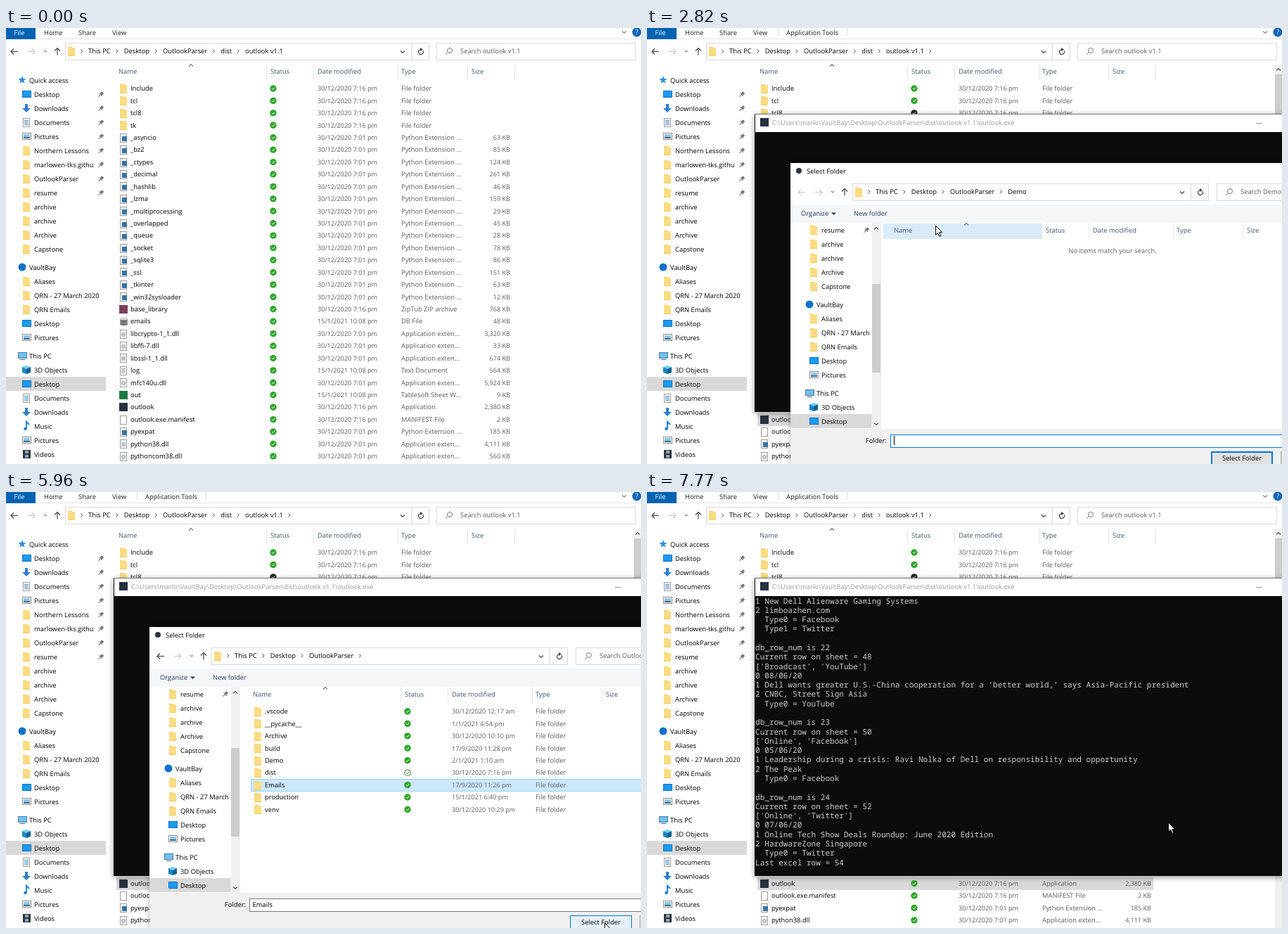
These frames come from a looping animation (903 by 620 pixels, 8000 ms). An HTML page with a canvas:

```html
<!DOCTYPE html>
<html lang="en">
<meta charset="utf-8">
<title>Folder parser demo</title>
<style>
  html, body { margin: 0; width: 100%; height: 100%; overflow: hidden; background: #fff; }
  #stage { position: relative; width: 100%; height: 100%; overflow: hidden; overflow: clip; contain: strict; }
  canvas { position: absolute; left: 0; top: 0; }
</style>
<body>
<div id="stage"></div>
<script>
const LOOP = 8000, ROW = 17.43, BLUE = '#0078d7', GREY = '#5c5c5c';
let g; // context of the layer being drawn

function makeLayer(originX, originY) {
  const canvas = document.createElement('canvas');
  canvas.width = 960;
  canvas.height = 660;
  canvas.style.transformOrigin = `${originX}px ${originY}px`;
  document.getElementById('stage').append(canvas);
  const ctx = canvas.getContext('2d');
  ctx.textRendering = 'geometricPrecision';
  return ctx;
}
const explorerLayer = makeLayer(0, 0), consoleLayer = makeLayer(581, 334);
const dialogLayer = makeLayer(567, 398), pointerLayer = makeLayer(0, 0);

// Drawing helpers
const UI_FONT = '"Open Sans", "Noto Sans", sans-serif';
const MONO_FONT = '11.06px "Noto Sans Mono", "DejaVu Sans Mono", monospace';

function text(s, x, y, color = '#000', align = 'left', size = 9.4) {
  g.font = `${size}px ${UI_FONT}`;
  g.fillStyle = color;
  g.textAlign = align;
  g.fillText(s, x, Math.round(y + 3.3));
  return g.measureText(s).width;
}
const digits = (s, x, y, align) => text(s, x, y, GREY, align, 9.1);

function box(x, y, w, h, fill, stroke) {
  if (fill) { g.fillStyle = fill; g.fillRect(x, y, w, h); }
  if (stroke) { g.strokeStyle = stroke; g.lineWidth = 1; g.strokeRect(x + .5, y + .5, w - 1, h - 1); }
}
function line(color, width, ...points) {
  g.strokeStyle = color;
  g.lineWidth = width;
  g.beginPath();
  points.forEach(p => g.lineTo(...p));
  g.stroke();
}
function shape(fill, ...points) {
  g.fillStyle = fill;
  g.beginPath();
  points.forEach(p => g.lineTo(...p));
  g.fill();
}
function disc(x, y, r, fill) {
  g.fillStyle = fill;
  g.beginPath();
  g.arc(x, y, r, 0, 7);
  g.fill();
}
function at(x, y, draw) {
  g.save();
  g.translate(x, y);
  draw();
  g.restore();
}
function shadowBox(x, y, w, h, fill, strength) {
  g.save();
  g.shadowColor = `rgba(0,0,0,${strength})`;
  g.shadowBlur = 8;
  g.shadowOffsetY = 2;
  box(x, y, w, h, fill);
  g.restore();
}
const right = (x, y) => line('#444', 1, [x - 1.3, y - 2.6], [x + 1.3, y], [x - 1.3, y + 2.6]);
const down = (x, y, s = 3, color = '#444') => line(color, 1.2, [x - s, y - s / 2], [x, y + s / 2], [x + s, y - s / 2]);
const up = (x, y, s = 3, color = '#666') => line(color, 1.2, [x - s, y + s / 2], [x, y - s / 2], [x + s, y + s / 2]);
const arrow = (x, y, color) => {
  line(color, 1.2, [x - 5, y], [x + 5, y]);
  line(color, 1.2, [x - 1, y - 4], [x - 5, y], [x - 1, y + 4]);
};

const page = () => box(-5, -6, 10, 13, '#fff', '#9a9a9a');
const pageLines = color => { page(); for (let y = -3; y < 5; y += 2) box(-3, y, 6, 1, color); };
const screen = () => box(-6, -5, 13, 10, '#1a9cf0', '#0b6fc0');
const icons = {
  folder() { box(-5, -6, 6, 12, '#f5d06c'); box(-5, -5, 10, 12, '#fbdc82'); box(-5, 6, 10, 1, '#efc75f'); },
  py() { page(); box(-2, -2, 7, 7, '#3572a5'); },
  dll() { page(); disc(0, 1, 3, '#a9b0b8'); disc(0, 1, 1.2, '#fff'); },
  page,
  log() { pageLines('#999'); },
  doc() { pageLines('#4d8fc4'); },
  zip() { box(-6, -6, 12, 12, '#7a3f58'); },
  xls() { box(-6, -6, 12, 12, '#1d7a45'); },
  exe() { box(-6, -6, 12, 12, '#26303f'); },
  db() {
    box(-5, -4, 11, 9, '#a6a6a6');
    for (const y of [-4, 0, 4]) { g.fillStyle = y < 0 ? '#ddd' : '#777'; g.beginPath(); g.ellipse(.5, y, 5.5, 2, 0, 0, 7); g.fill(); }
  },
  star() {
    const tips = Array.from({ length: 10 }, (_, i) => {
      const a = i * Math.PI / 5 - Math.PI / 2, r = i % 2 ? 2.4 : 6;
      return [r * Math.cos(a), r * Math.sin(a)];
    });
    shape('#2a8dd8', ...tips);
  },
  desktop: screen,
  download() { shape('#2f7fcb', [-2, -6], [2, -6], [2, 0], [6, 0], [0, 6], [-6, 0], [-2, 0]); },
  picture() { box(-6, -5, 13, 10, '#fff', '#888'); box(-4, -3, 9, 6, '#8cc5ec'); box(-4, 1, 9, 2, '#49687a'); },
  cloud() { disc(0, 0, 5.5, '#0a72c8'); },
  pc() { box(-6, -5, 13, 9, '#6fc0f2', '#467a9c'); box(-3, 5, 7, 1, '#567'); },
  cube() {
    shape('#6fd0ef', [0, -6], [6, -4], [0, -1], [-6, -4]);
    shape('#1c86c4', [-6, -4], [0, -1], [0, 6], [-6, 4]);
    shape('#0d5f98', [6, -4], [0, -1], [0, 6], [6, 4]);
  },
  music() { line('#1f84d6', 2, [0, 4], [0, -6], [4, -2]); disc(-1.5, 4, 2.3, '#1f84d6'); },
  video() { box(-5, -6, 11, 12, '#333'); box(-2, -5, 5, 4, '#7aa9cf'); box(-2, 1, 5, 4, '#7aa9cf'); }
};
const icon = (name, x, y) => at(Math.round(x), Math.round(y), icons[name]);

// Data
const sideGroups = [
  [74, 'star Quick access;desktop Desktop;download Downloads;doc Documents;picture Pictures;folder Northern Lessons;' +
       'folder marlowen-tks.githu;folder OutlookParser;folder resume;folder archive;folder archive;folder Archive;folder Capstone'],
  [340, 'cloud VaultBay;folder Aliases;folder QRN - 27 March 2020;folder QRN Emails;desktop Desktop;picture Pictures'],
  [466, 'pc This PC;cube 3D Objects;desktop Desktop;doc Documents;download Downloads;music Music;picture Pictures;video Videos']
].map(([y, list]) => [y, list.split(';').map(s => [s.slice(0, s.indexOf(' ')), s.slice(s.indexOf(' ') + 1)])]);

const early = '30/12/2020 7:01 pm', late = '30/12/2020 7:16 pm', recent = '15/1/2021 10:08 pm';
const kinds = {
  folder: ['File folder', late], py: ['Python Extension ...', early], dll: ['Application exten...', early],
  zip: ['ZipTub ZIP archive', late], db: ['DB File', recent], log: ['Text Document', recent],
  xls: ['Tablesoft Sheet W...', recent], exe: ['Application', late], page: ['MANIFEST File', late]
};
const files = ('folder Include;folder tcl;folder tcl8;folder tk;py _asyncio 63;py _bz2 85;py _ctypes 124;py _decimal 261;' +
  'py _hashlib 46;py _lzma 159;py _multiprocessing 29;py _overlapped 45;py _queue 28;py _socket 78;py _sqlite3 86;' +
  'py _ssl 151;py _tkinter 63;py _win32sysloader 12;zip base_library 768;db emails 48;dll libcrypto-1_1.dll 3,320;' +
  'dll libffi-7.dll 33;dll libssl-1_1.dll 674;log log 564;dll mfc140u.dll 5,924;xls out 9;exe outlook 2,380;' +
  'page outlook.exe.manifest 2;py pyexpat 185;dll python38.dll 4,111;dll pythoncom38.dll 560;dll pywintypes38.dll 140')
  .split(';').map(s => {
    const [kind, name, size] = s.split(' ');
    return { kind, name, size, type: kinds[kind][0], date: kinds[kind][1] };
  });
const shiftedFiles = [...files.slice(0, 4), files[4], ...files.slice(4)];
const OUTLOOK = files.findIndex(f => f.name === 'outlook');

const projectFolders = ('.vscode 30/12/2020 12:17 am;__pycache__ 1/1/2021 4:54 pm;Archive 30/12/2020 10:10 pm;' +
  'build 17/9/2020 11:28 pm;Demo 2/1/2021 1:10 am;dist 30/12/2020 7:16 pm;Emails 17/9/2020 11:26 pm;' +
  'production 15/1/2021 6:40 pm;venv 30/12/2020 10:29 pm').split(';').map(s => {
    const [name, ...date] = s.split(' ');
    return { kind: 'folder', name, date: date.join(' '), type: 'File folder', tick: name === 'dist' ? 'hollow' : '' };
  });
const EMAILS = 6;

const entry = (row, media, day, title, outlet) => [
  `db_row_num is ${row}`, `Current row on sheet = ${row * 2 + 4}`,
  `[${media.map(m => `'${m}'`).join(', ')}]`, `0 ${day}/06/20`, `1 ${title}`, `2 ${outlet}`,
  ...media.slice(1).map((m, i) => `  Type${i} = ${m}`), ''
];
const titles = ['Remote work tips for small teams', 'New laptops arrive in June', 'Keeping data safe at home', 'Student device deals'];
const output = [];
for (let row = 1; row < 21; row++)
  output.push(...entry(row, ['Online', row % 3 ? 'Facebook' : 'Twitter'], `0${row % 9 + 1}`, titles[row % 4], 'Daily Tech Notes'));
output.push(
  ...entry(21, ['Online', 'Facebook', 'Twitter'], '05', 'New Dell Alienware Gaming Systems', 'limboazhen.com'),
  ...entry(22, ['Broadcast', 'YouTube'], '08', 'Dell wants greater U.S.-China cooperation for a ‘better world,’ says Asia-Pacific president', 'CNBC, Street Sign Asia'),
  ...entry(23, ['Online', 'Facebook'], '05', 'Leadership during a crisis: Ravi Nolka of Dell on responsibility and opportunity', 'The Peak'),
  ...entry(24, ['Online', 'Twitter'], '07', 'Online Tech Show Deals Roundup: June 2020 Edition', 'HardwareZone Singapore').slice(0, -1),
  'Last excel row = 54');

// Parts shared by the explorer and the dialog
function sidebar(pinX) {
  box(-4, 496, 146, 20, '#d9d9d9');
  sideGroups.forEach(([top, items], group) => items.forEach(([kind, label], i) => {
    const y = top + i * 20 + .4, inset = i ? 6 : 0;
    icon(kind, 23 + inset, y);
    text(label, 33 + inset + (i ? 1 : 0), y);
    if (!group && i > 0 && i < 9) at(pinX, y, () => {
      g.rotate(Math.PI / 4);
      box(-2, -4, 4, 4, '#777');
      box(-3, 0, 6, 1, '#777');
      box(-.5, 1, 1, 4, '#777');
    });
  }));
}

function navigation(crumbs, trailing, searchText, backColor, end, searchX) {
  arrow(12, 33.5, backColor);
  at(36, 33.5, () => { g.scale(-1, 1); arrow(0, 0, '#ccc'); });
  down(56, 33, 2, '#888');
  at(73, 33.5, () => { g.rotate(Math.PI / 2); arrow(0, 0, '#444'); });
  box(84, 21, end - 84, 25, '#fff', '#d9d9d9');
  box(end - 26, 21, 1, 25, '#d9d9d9');
  icon('folder', 93, 33);
  right(107.5, 33);
  let x = 117;
  crumbs.forEach((label, i) => {
    x += text(label, x, 33) + 9;
    if (trailing || i < crumbs.length - 1) right(x, 33);
    x += 10;
  });
  down(end - 38, 34);
  g.strokeStyle = '#444';
  g.lineWidth = 1.2;
  g.beginPath();
  g.arc(end - 12, 34, 3.4, -.6, 4.4);
  g.stroke();
  shape('#444', [end - 13, 28], [end - 9, 30.5], [end - 13, 33]);
  box(searchX, 21, 284, 25, '#fff', '#d9d9d9');
  g.strokeStyle = '#777';
  g.lineWidth = 1;
  g.beginPath();
  g.arc(searchX + 19, 32, 3.5, 0, 7);
  g.stroke();
  line('#777', 1, [searchX + 16.5, 34.5], [searchX + 13, 38]);
  text(searchText, searchX + 34, 33, GREY);
}

function tick(x, y, style) {
  disc(x, y, 4.7, style === 'dark' ? '#222' : style === 'hollow' ? '#3d7a45' : '#2fa52b');
  if (style === 'hollow') disc(x, y, 3.7, '#fff');
  line(style === 'hollow' ? '#3d7a45' : '#fff', 1, [x - 2, y], [x - .5, y + 1.6], [x + 2.2, y - 1.5]);
}

function fileList(rows, highlights, width, headerHover) {
  if (headerHover) box(145, 52, 226, 22, '#d9ebf9');
  for (const [label, x] of [['Name', 160], ['Status', 376], ['Date modified', 443], ['Type', 562], ['Size', 662]]) text(label, x, 62, '#43566f');
  for (const x of [370, 437, 557, 656, 723]) box(x, 52, 1, 22, '#e5e5e5');
  up(263, 53, 3, '#777');
  for (const [index, fill, border] of highlights) if (rows[index])
    box(157, Math.round(86 + index * ROW - 8.7), width, 18, fill, border);
  rows.forEach((f, i) => {
    const y = 86 + i * ROW;
    icon(f.kind, 167, y);
    text(f.name, 177, y);
    tick(380, y, f.tick);
    digits(f.date, 443, y, 'left');
    text(f.type, 562, y, GREY);
    if (f.size) digits(f.size + ' KB', 717, y, 'right');
  });
}
const rowAt = y => Math.floor((y - 86 + 8.7) / ROW);

// Windows
function drawExplorer(t, [px, py]) {
  box(0, 0, 960, 660, '#fff');
  box(0, 15, 903, 1, '#e3e4e5');
  box(0, 0, 42, 16, '#0063b1');
  text('File', 19, 7, '#fff', 'center');
  text('Home', 54, 7, '#222');
  text('Share', 103, 7, '#222');
  text('View', 151, 7, '#222');
  if (t >= 850) {
    box(186, 0, 1, 12, '#ddd');
    box(284, 0, 1, 12, '#ddd');
    text('Application Tools', 198, 7, '#222');
  }
  down(879, 6, 3, '#888');
  disc(897, 6, 6.5, '#0a64b8');
  text('?', 897, 6, '#fff', 'center');
  navigation(['This PC', 'Desktop', 'OutlookParser', 'dist', 'outlook v1.1'], t >= 2180, 'Search outlook v1.1', '#444', 602, 612);
  sidebar(135);

  const inserted = t >= 1780, highlights = [];
  if (t >= 70 && t < 850) highlights.push([rowAt(py), '#e5f3ff']);
  if (t >= 520) highlights.push([OUTLOOK + inserted, t < 1065 ? '#cce8ff' : '#d9d9d9']);
  files[2].tick = t >= 1470 ? 'dark' : '';
  fileList(inserted ? shiftedFiles : files, highlights, 563);
  if (inserted) {
    box(893, 52, 10, 568, '#f0f0f0');
    box(893, 66, 10, 470, '#cdcdcd');
    up(898, 59, 3, '#505050');
  }
}

function drawConsole(t) {
  const active = t < 1590;
  shadowBox(153, 122, 850, 424, '#0c0c0c', .4);
  box(154, 123, 850, 25, '#fff');
  box(153, 122, 850, 1, '#777');
  icon('exe', 167, 134);
  text('C:\\Users\\marlo\\VaultBay\\Desktop\\OutlookParser\\dist\\outlook v1.1\\outlook.exe', 178, 135, active ? '#000' : '#999');
  box(866, 135, 9, 1, active ? '#000' : '#999');
  box(904, 132, 7, 7, null, '#555');
  if (t < 1470) box(154, 157, 7, 3, '#eee');

  const printed = Math.floor(output.length * clamp((t - 6750) / 1020));
  g.font = MONO_FONT;
  g.fillStyle = '#ccc';
  g.textAlign = 'left';
  output.slice(Math.max(0, printed - 29), printed).forEach((s, i) => g.fillText(s, 154, Math.round(158.6 + i * 13.286)));
}

function drawDialog(t, [px, py]) {
  const atProject = t >= 3290, chosen = t >= 4800;
  shadowBox(204, 192, 800, 500, '#fff', .3);
  disc(216, 203, 4, '#2b3440');
  text('Select Folder', 227, 204);
  at(208, 200, () => navigation(['This PC', 'Desktop', 'OutlookParser', ...(atProject ? [] : ['Demo'])], atProject,
    atProject ? 'Search OutlookParser' : 'Search Demo', atProject ? '#444' : '#ccc', 591, 602));
  if (!atProject && py > 221 && py < 246 && px > 427 && px < 508) {
    box(428, 222, 79, 23, '#e5f3ff', '#cce8ff');
    text('OutlookParser', 431, 233);
    right(502, 233);
  }
  box(204, 251, 760, 26, '#f5f6f7');
  text('Organize', 219, 264, '#1e395b');
  shape('#1e395b', [262, 262.5], [269, 262.5], [265.5, 266]);
  text('New folder', 294, 264, '#1e395b');

  g.save();
  g.beginPath();
  g.rect(204, 277, 115.5, 293);
  g.clip();
  at(208, 53, () => sidebar(104));
  g.restore();
  box(320, 277, 13, 293, '#f0f0f0');
  box(320, 364, 12, 126, '#cdcdcd');
  up(326, 285, 3, '#505050');
  down(326, 563, 3, '#505050');

  const highlights = [];
  if (atProject && px > 348 && py < 480) highlights.push([rowAt(py - 226), '#e5f3ff']);
  if (chosen) highlights.push([EMAILS, '#cce8ff', '#99d1ff']);
  const headerHover = py > 278 && py < 300 && px > 336 && px < 562;
  at(191, 226, () => fileList(atProject ? projectFolders : [], highlights, 640, headerHover));
  if (!atProject) text('No items match your search.', 662, 317, GREY, 'center');

  box(204, 570, 760, 90, '#f0f0f0');
  text('Folder:', 341, 587, '#000', 'right');
  box(346, 578, 640, 19, '#fff', t < 5000 ? BLUE : '#7a7a7a');
  if (chosen) text('Emails', 350.5, 587);
  else if (atProject) {
    box(350, 580, 64, 14, BLUE);
    text('OutlookParser', 350.5, 587, '#fff');
  } else if (Math.floor((t - 1650) / 530) % 2 === 0) box(351, 580, 1, 13, '#000');
  const hovered = py > 601 && px > 802;
  box(802, 602, 88, 24, hovered ? '#e5f1fb' : '#e1e1e1', BLUE);
  if (!hovered) box(803, 603, 86, 22, null, BLUE);
  text('Select Folder', 846, 611.5, '#000', 'center');
  box(901, 602, 70, 24, '#e1e1e1', '#adadad');
}

function drawPointer([x, y]) {
  at(x, y, () => {
    const outline = [[.5, 0], [.5, 13], [3.5, 10.3], [5.8, 15.3], [7.8, 14.4], [5.6, 9.6], [9.6, 9.4], [.5, 0]];
    shape('#fff', ...outline);
    line('#000', 1, ...outline);
  });
}

// Motion
const clamp = v => Math.min(1, Math.max(0, v));
const track = [[70, 328, 562], [220, 327, 520], [380, 327, 521], [540, 326, 532], [650, 326, 532], [690, 335, 535], [850, 335, 535],
  [1150, 335, 540], [1470, 336, 541], [1690, 351, 460], [2340, 351, 460], [2740, 400, 290], [3060, 463, 234], [3480, 463, 234],
  [4060, 409, 402], [4230, 400, 414], [4310, 400, 414], [4460, 396, 445], [4640, 396, 445], [4830, 393, 409], [4920, 393, 409],
  [5800, 850, 607], [5950, 851, 613], [6200, 851, 613], [6500, 846, 602], [7020, 790, 515], [7750, 741, 470]];

function pointerAt(t) {
  const next = track.findIndex(k => k[0] > t);
  if (next < 1) return (next ? track[track.length - 1] : track[0]).slice(1);
  const [t0, x0, y0] = track[next - 1], [t1, x1, y1] = track[next];
  const p = (t - t0) / (t1 - t0), e = p * p * (3 - 2 * p);
  return [x0 + (x1 - x0) * e, y0 + (y1 - y0) * e];
}
const opening = (t, start) => 1 - (1 - clamp((t - start) / 200)) ** 2;

function drawLayer(ctx, visible, draw) {
  g = ctx;
  g.canvas.style.opacity = visible;
  g.canvas.style.transform = visible < 1 ? `scale(${.96 + .04 * visible})` : 'none';
  g.clearRect(0, 0, 960, 660);
  if (visible > 0) draw();
}
function frame(now) {
  const t = now % LOOP, pointer = pointerAt(t);
  drawLayer(explorerLayer, 1, () => drawExplorer(t, pointer));
  drawLayer(consoleLayer, opening(t, 1065), () => drawConsole(t));
  drawLayer(dialogLayer, t < 6150 ? opening(t, 1598) : 1 - clamp((t - 6150) / 200), () => drawDialog(t, pointer));
  drawLayer(pointerLayer, t < 70 ? 0 : 1, () => drawPointer(pointer));
  requestAnimationFrame(frame);
}
requestAnimationFrame(frame);
</script>
</body>
</html>
```
